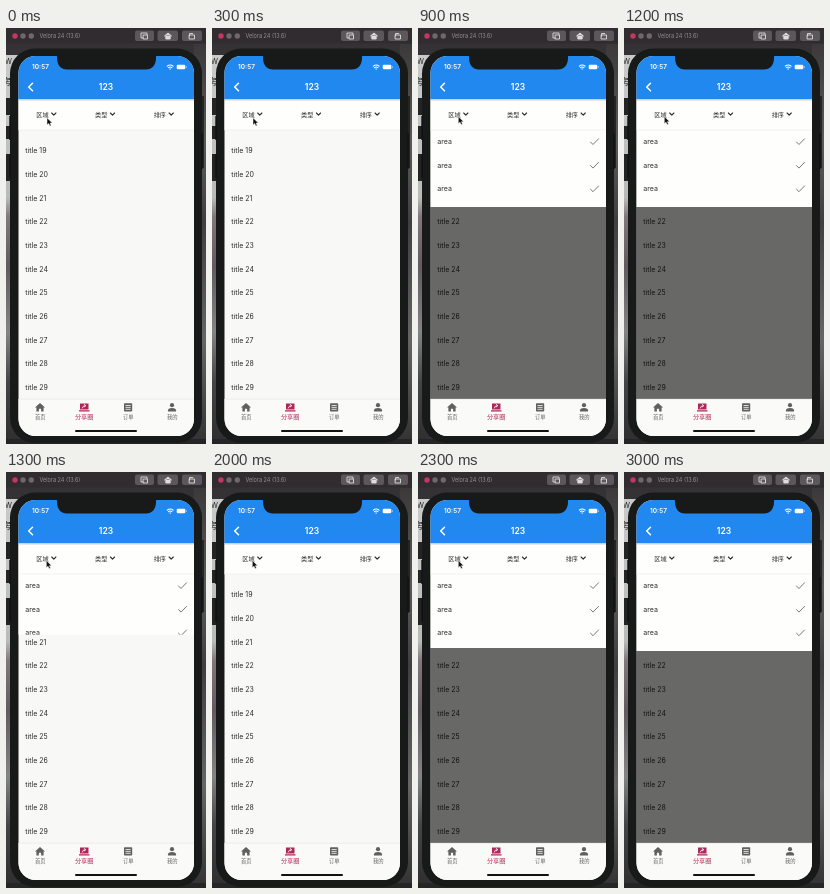
An HTML page that plays this animation: 200x416 px, repeating every 3.1 s.

```html
<!DOCTYPE html>
<html lang="zh-CN">
<head>
<meta charset="utf-8">
<title>Dropdown menu</title>
<style>
  html, body { margin: 0; width: 100%; height: 100%; overflow: hidden; background: #292829; }
  svg { display: block; width: 200px; height: 416px; }
  text { font-family: Inter, "Noto Sans CJK SC", "Noto Sans CJK", sans-serif; }
  .mid { text-anchor: middle; }
  .row { font-size: 7px; fill: #2b2c2b; }
  .line { fill: none; stroke-linecap: round; stroke-linejoin: round; }
</style>
</head>
<body>
<svg viewBox="0 0 200 416" xmlns="http://www.w3.org/2000/svg">
  <defs>
    <linearGradient id="left" x2="0" y2="1">
      <stop offset="0" stop-color="#c9cac9"/>
      <stop offset=".37" stop-color="#b9bbb9"/>
      <stop offset=".42" stop-color="#81787b"/>
      <stop offset=".55" stop-color="#625a5e"/>
      <stop offset=".72" stop-color="#858485"/>
      <stop offset=".85" stop-color="#444345"/>
      <stop offset="1" stop-color="#302f30"/>
    </linearGradient>
    <linearGradient id="right" x2="0" y2="1">
      <stop offset="0" stop-color="#3b393a"/>
      <stop offset=".25" stop-color="#5b5a5b"/>
      <stop offset=".45" stop-color="#403e40"/>
      <stop offset=".75" stop-color="#666566"/>
      <stop offset="1" stop-color="#353435"/>
    </linearGradient>
    <linearGradient id="shade" x2="0" y2="1">
      <stop offset="0" stop-color="#000" stop-opacity=".22"/>
      <stop offset="1" stop-color="#000" stop-opacity="0"/>
    </linearGradient>
    <clipPath id="screen"><rect x="12.5" y="28" width="175.5" height="380" rx="17"/></clipPath>
    <clipPath id="reveal"><rect id="window" x="12" y="102" width="177" height="0"/></clipPath>
  </defs>

  <!-- desktop and window bar -->
  <rect width="200" height="416" fill="#343234"/>
  <rect y="27" width="12" height="385" fill="url(#left)"/>
  <rect x="188" y="16" width="12" height="396" fill="url(#right)"/>
  <g fill="#252425">
    <rect y="70" width="5" height="17"/>
    <rect y="98" width="5" height="13"/>
    <rect y="126" width="5" height="27"/>
    <rect x="195" y="68" width="3" height="72"/>
  </g>
  <text x="-1" y="36" font-size="7" fill="#222">W</text>
  <text x="-4" y="57" font-size="9" fill="#222">房</text>
  <rect y="411" width="200" height="5" fill="#252527"/>
  <rect width="200" height="15.5" fill="#302c2f"/>
  <circle cx="9" cy="8" r="2.7" fill="#c23860"/>
  <circle cx="17" cy="8" r="2.7" fill="#70676b"/>
  <circle cx="25.3" cy="8" r="2.7" fill="#70676b"/>
  <text x="33.5" y="10.1" font-size="5.5" fill="#969295">Velora 24 (13.6)</text>
  <g fill="#5b575a">
    <rect x="129" y="2.5" width="19" height="10.5" rx="2"/>
    <rect x="151.5" y="2.5" width="20.5" height="10.5" rx="2"/>
    <rect x="176" y="2.5" width="20" height="10.5" rx="2"/>
  </g>
  <g class="line" stroke="#dedcdd" stroke-width=".9">
    <path d="M137 10h-2V5h6v1.5M137.5 7h4v4h-4z"/>
    <path d="M158.5 8l3.5-3 3.5 3M159.8 7.5V11h4.4V7.5" fill="#dedcdd"/>
    <path d="M183.5 8V5.5h3.2M183.5 7h5v4h-5z"/>
  </g>

  <!-- phone -->
  <rect x="4" y="20.5" width="192" height="394.5" rx="25" fill="#181a19"/>
  <path d="M4 88v24M4 126v24M196 105v36" stroke="#111" stroke-width="1.4"/>
  <g clip-path="url(#screen)">
    <rect x="12" y="28" width="177" height="381" fill="#f8f9f7"/>
    <g id="list"></g>
    <rect id="mask" x="12" y="102" width="177" height="269" fill="#000" fill-opacity=".58"/>
    <g clip-path="url(#reveal)">
      <rect x="12" y="102" width="177" height="78" fill="#fefffd"/>
      <g id="options"></g>
    </g>

    <rect x="12" y="71" width="177" height="31" fill="#fefffd"/>
    <path d="M12 102h177" stroke="#e9eae8" stroke-width=".6"/>
    <g id="filters"></g>

    <rect x="12" y="28" width="177" height="43" fill="#2088ee"/>
    <rect x="12" y="71" width="177" height="2.5" fill="url(#shade)"/>
    <path d="M48 27c3 0 3 1 3 3 0 7 4 11.500 10 11.500h79c6 0 10-4.500 10-11.500 0-2 0-3 3-3z" fill="#181a19"/>
    <text class="mid" x="34.500" y="41.300" font-size="6.500" font-weight="600" fill="#fff">10:57</text>
    <path class="line" d="M161.300 38.200q2.900-2.500 5.800 0M162.500 39.700q1.700-1.400 3.400 0M163.900 41h.6" stroke="#fff" stroke-width="1.100"/>
    <rect x="170.700" y="36.700" width="8.600" height="4.600" rx="1.300" fill="#fff"/>
    <path d="M180.300 38.300v1.500" stroke="#d5e8fc" stroke-width=".8"/>
    <path class="line" d="M26.500 55.200l-3.800 3.800 3.800 3.800" stroke="#fff" stroke-width="1.500"/>
    <text class="mid" x="100" y="62" font-size="8.500" font-weight="600" fill="#fff">123</text>

    <rect x="12" y="371" width="177" height="38" fill="#fafbf8"/>
    <path d="M12 371.200h177" stroke="#dedfdd" stroke-width=".5"/>
    <g fill="#5f605f">
      <path d="M34 375l-5 4.500h1.400v4h2.500v-2.800h2.200v2.800h2.500v-4H39z"/>
      <rect x="118" y="375.300" width="8.200" height="8.200" rx=".8"/>
      <circle cx="166" cy="377.200" r="2.100"/>
      <path d="M162 383.500v-1.200c0-3.200 8-3.200 8 0v1.200z"/>
    </g>
    <path d="M119.500 377.500h5.200M119.500 379.400h5.200M119.500 381.300h5.200" stroke="#fafbf8" stroke-width=".8"/>
    <path d="M74 375.500h8.500v6H74zM73 382.300h10.500v1.300H73z" fill="#b1265a"/>
    <path class="line" d="M76.200 380q.4-2.300 3-2.300m-1-1.200l1.600 1.200-1.600 1.200" stroke="#fff" stroke-width=".8"/>
    <g id="tabs"></g>
    <rect x="69" y="402" width="62" height="2.100" rx="1" fill="#111"/>
  </g>

  <path id="cursor" d="M0 0v7.200l1.700-1.500 1.100 2.500 1.400-.6-1.100-2.400h2.300z" fill="#111" stroke="#fff" stroke-width=".5"/>
</svg>
<script>
  const LOOP = 3100, STEP = 100, SLIDE = 300, PANEL = 77;
  const OPEN_1 = 337, CLOSE = 1237, OPEN_2 = 2012, CURSOR_OUT = 2700;
  const $ = id => document.getElementById(id);

  function add(parent, tag, attrs, label) {
    const el = document.createElementNS("http://www.w3.org/2000/svg", tag);
    for (const key in attrs) el.setAttribute(key, attrs[key]);
    if (label) el.textContent = label;
    parent.append(el);
  }

  for (let i = 0; i < 11; i++) {
    add($("list"), "text", { class: "row", x: 19.3, y: 125.2 + i * 23.67 }, "title " + (19 + i));
  }

  for (let i = 0; i < 3; i++) {
    const y = 113.5 + i * 23.6;
    add($("options"), "text", { class: "row", x: 19.3, y: y + 2.4 }, "area");
    add($("options"), "path", {
      class: "line", d: `M172.500 ${y + .5}l2.500 2.500 5.500-5.700`, stroke: "#777977", "stroke-width": 1
    });
  }

  ["区域", "类型", "排序"].forEach((label, i) => {
    const x = 30.3 + i * 58.7;
    add($("filters"), "text", { x, y: 88.5, "font-size": 6.2, fill: "#292a29" }, label);
    add($("filters"), "path", {
      class: "line", d: `M${x + 15.4} 85l2.100 2.100 2.100-2.100`, stroke: "#292a29", "stroke-width": 1.1
    });
  });

  ["首页", "分享圈", "订单", "我的"].forEach((label, i) => {
    const on = i === 1;
    add($("tabs"), "text", {
      class: "mid", x: 34.2 + i * 44, y: on ? 391.2 : 391,
      "font-size": on ? 6.2 : 5.3, fill: on ? "#b1265a" : "#646564"
    }, label);
  });

  const ramp = (t, start) => Math.min(1, Math.max(0, (t - start) / SLIDE));

  function draw(now) {
    const t = Math.floor((now % LOOP) / STEP) * STEP;
    const shown = ramp(t, OPEN_1) - ramp(t, CLOSE) + ramp(t, OPEN_2);
    const masked = (t > OPEN_1 && t < CLOSE) || t > OPEN_2;
    $("window").setAttribute("height", PANEL * shown);
    $("mask").style.display = masked ? "" : "none";
    $("cursor").style.display = t < CURSOR_OUT ? "" : "none";
    $("cursor").setAttribute("transform", t < 700 ? "translate(41 89.800)" : "translate(40.300 88.500)");
    requestAnimationFrame(tick);
  }

  const begin = performance.now();
  function tick() { draw(performance.now() - begin); }
  tick();
</script>
</body>
</html>
```
